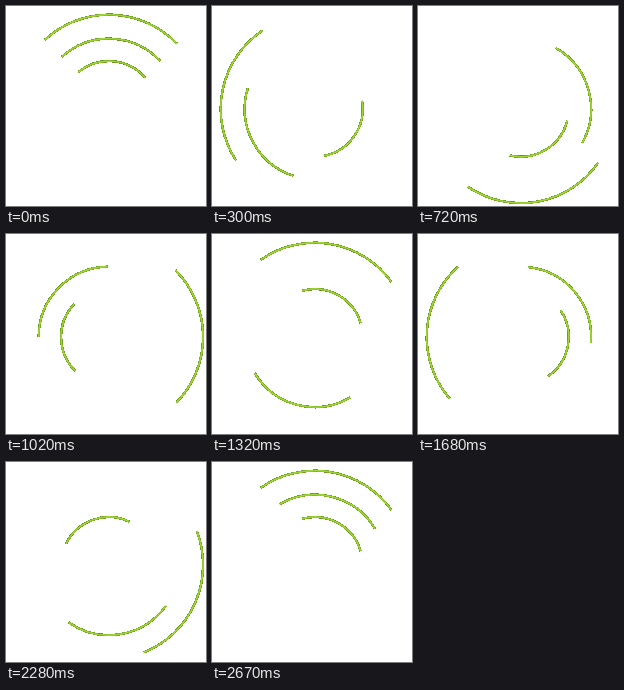
These frames come from a looping animation (200x200 px, 2700 ms). An HTML page:

```html
<!DOCTYPE html>
<html lang="en">
<head>
<meta charset="utf-8">
<title>Spinning arcs</title>
<style>
  html, body { margin: 0; width: 100%; height: 100%; overflow: hidden; background: #fff; }
  svg { display: block; width: 100vw; height: 100vh; }
  path { fill: none; }
  .rim { stroke: #64901f; stroke-width: 2.6; shape-rendering: crispEdges; }
  .core { stroke: #9fd732; stroke-width: 1.7; }
</style>
</head>
<body>
<svg viewBox="0 0 200 200"></svg>
<script>
const NS = "http://www.w3.org/2000/svg";
const LOOP = 2700, STEP = 30, LEAD = 6;
const CENTER = 102.9, SPAN = 89.4;

// radius, turns per loop (counter-clockwise)
const RINGS = [[94.2, 2], [70.2, 3], [47.8, 6]];

const svg = document.querySelector("svg");

function add(parent, tag, attrs) {
  const el = document.createElementNS(NS, tag);
  for (const key in attrs) el.setAttribute(key, attrs[key]);
  return parent.appendChild(el);
}

const arcs = RINGS.map(([r, turns]) => {
  const half = SPAN * Math.PI / 360;
  const x = r * Math.sin(half), y = -r * Math.cos(half);
  const d = `M${-x} ${y}A${r} ${r} 0 0 1 ${x} ${y}`;
  const g = add(svg, "g", {});
  add(g, "path", { d, class: "rim" });
  add(g, "path", { d, class: "core" });
  return { g, turns };
});

function draw(time) {
  const step = Math.floor((time % LOOP) / STEP);
  const phase = (step * STEP - LEAD) / LOOP;
  for (const { g, turns } of arcs) {
    g.setAttribute("transform",
      `translate(${CENTER} ${CENTER}) rotate(${-360 * turns * phase})`);
  }
}

const start = performance.now();
function tick() {
  draw(performance.now() - start);
  requestAnimationFrame(tick);
}
tick();
</script>
</body>
</html>
```
